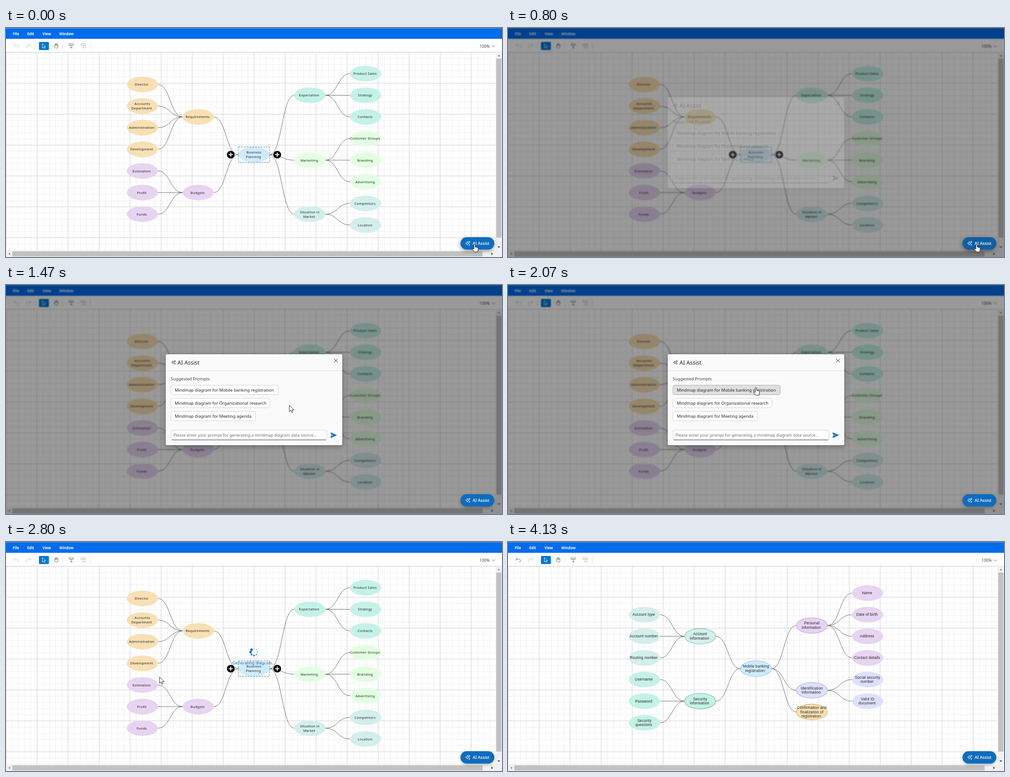
An HTML page that plays this animation: 1099x509 px, repeating every 6800 ms.

```html
<!DOCTYPE html>
<html lang="en">
<head>
<meta charset="utf-8">
<title>Mind map editor</title>
<style>
html, body { margin: 0; width: 100%; height: 100%; overflow: hidden; background: #fff; }
svg, #shade { position: absolute; left: 0; top: 0; width: 1099px; height: 509px; }
#shade { background: rgba(0,0,0,.4); backdrop-filter: blur(1px); }
text { font-family: "Noto Sans", "Open Sans", sans-serif; white-space: pre; }
.bold { font-weight: 600; fill: #fff; }
.label { font-size: 7.6px; letter-spacing: .25px; fill: #222; text-anchor: middle; }
.plain .label { font: 8.2px "Liberation Sans", Arial, sans-serif; letter-spacing: .22px; }
.line { fill: none; stroke: #444; stroke-width: .8; }
.icon { fill: none; stroke: #616161; stroke-width: .9; stroke-linecap: round; stroke-linejoin: round; }
.faint { stroke: #c4c4c4; }
#button rect { filter: drop-shadow(0 2px 3px rgba(0,0,0,.3)); }
#button.hover rect { filter: drop-shadow(0 3px 5px rgba(0,0,0,.4)); }
#panel { filter: drop-shadow(0 3px 6px rgba(0,0,0,.3)); }
</style>
</head>
<body>
<svg id="app" viewBox="0 0 1099 509"></svg>
<div id="shade"></div>
<svg id="top" viewBox="0 0 1099 509"></svg>
<script>
const TICK = 1000 / 15, LOOP = 6800;
const $ = id => document.getElementById(id);
const rect = (x, y, w, h, fill, more = '') =>
  `<rect x="${x}" y="${y}" width="${w}" height="${h}" fill="${fill}" ${more}/>`;
const path = (d, more = 'class="icon"') => `<path d="${d}" ${more}/>`;
const text = (x, y, size, str, more = 'fill="#242424"') =>
  `<text x="${x}" y="${y}" font-size="${size}" ${more}>${str}</text>`;

// ---- mind maps: [label, fill, children, stroke]
const ORANGE = '#f8e0b3', PURPLE = '#e7d4f1', MINT = '#c4f2e6',
  GREEN = '#e3ffe2', TEAL = '#d3efeb', LILAC = '#dee0ff', SKY = '#d0ebff';

const planning = {
  root: ['Business|Planning', SKY],
  left: { top: 125.5, groups: [
    ['Requirements', ORANGE, ['Director', 'Accounts|Department', 'Administration', 'Development']],
    ['Budgets', PURPLE, ['Estimation', 'Profit', 'Funds']]] },
  right: { top: 101.5, groups: [
    ['Expectation', MINT, ['Product Sales', 'Strategy', 'Contacts']],
    ['Marketing', GREEN, ['Customer Groups', 'Branding', 'Advertising']],
    ['Situation in|Market', TEAL, ['Competitors', 'Location']]] }
};
const banking = {
  root: ['Mobile banking|registration:', SKY, '#93c9ec'],
  left: { top: 161.5, groups: [
    ['Account|information', TEAL, ['Account type', 'Account number', 'Routing number'], '#8cc3ba'],
    ['Security|information', MINT, ['Username', 'Password', 'Security|questions'], '#83bdac']] },
  right: { top: 113.5, groups: [
    ['Personal|information', PURPLE, ['Name', 'Date of birth', 'Address', 'Contact details'], '#c9a9dc'],
    ['Identification|information', LILAC, ['Social security|number', 'Valid ID|document'], '#b0b4e0'],
    ['Confirmation and|finalization of|registration', ORANGE, [], '#e2b968']] }
};
const CX = 549.5, CY = 281.5, RX = 34.5, RY = 17.3, COL = 123.7, ROW = 48.05;

function node(x, y, label, fill, stroke = 'none') {
  const lines = label.split('|');
  const first = y + 2.8 - (lines.length - 1) * 4.9;
  return `<ellipse cx="${x}" cy="${y}" rx="${RX}" ry="${RY}" fill="${fill}" stroke="${stroke}" stroke-width="1.3"/>` +
    lines.map((s, i) => `<text class="label" x="${i == lines.length - 1 ? x - 1.3 : x}" y="${first + i * 9.8}">${s}</text>`).join('');
}
function link(x1, y1, x2, y2, dir) {
  const a = x1 + dir * RX, b = x2 - dir * RX, m = (a + b) / 2;
  return path(`M${a} ${y1}C${m} ${y1} ${m} ${y2} ${b} ${y2}`, 'class="line"');
}
function mindmap(map) {
  let links = '', nodes = node(CX, CY, ...map.root);
  for (const [side, dir] of [['left', -1], ['right', 1]]) {
    let y = map[side].top;
    const x1 = CX + dir * COL, x2 = x1 + dir * COL;
    for (const [label, fill, kids, stroke] of map[side].groups) {
      const mid = y + (kids.length - 1) * ROW / 2;
      links += link(CX, CY, x1, mid, dir);
      nodes += node(x1, mid, label, fill, stroke);
      for (const kid of kids) {
        links += link(x1, mid, x2, y, dir);
        nodes += node(x2, y, kid, fill);
        y += ROW;
      }
    }
  }
  return links + nodes;
}

// ---- editor window
function grid() {
  const step = 13.7375;
  let minor = '', major = '';
  for (let i = 0; i < 80; i++) {
    const d = `M${i * step + .3} 54V495` + (i < 33 ? `M0 ${54.1 + i * step}H1085` : '');
    if (i % 5) minor += d; else major += d;
  }
  return path(minor, 'stroke="#ebebeb" stroke-width=".8"') + path(major, 'stroke="#cfcfcf"');
}
const plus = x => `<circle cx="${x}" cy="${CY}" r="8.6"/>` +
  path(`M${x - 4.7} ${CY}h9.4M${x} ${CY - 4.7}v9.4`, 'stroke="#fff" stroke-width="1.9"');
const pointer = 'M0 0V14L3.3 11 5.5 16.2 7.9 15.2 5.7 10.3H10.4Z';
const sparkle = (x, y, s, color) => path(
  'M-1 -4Q-.6 0 3 0Q-.6 0-1 4Q-1.4 0-5 0Q-1.4 0-1-4ZM3.5-5Q3.7-3.2 5.5-3Q3.7-2.8 3.5-1Q3.3-2.8 1.5-3Q3.3-3.2 3.5-5ZM3.5 2Q3.7 3.3 5 3.5Q3.7 3.7 3.5 5Q3.3 3.7 2 3.5Q3.3 3.3 3.5 2Z',
  `transform="translate(${x} ${y}) scale(${s})" fill="none" stroke="${color}" stroke-width=".9"`);
const treeIcon = x => `M${x - 4.5} 35h9v3.5h-9zM${x} 38.5v5.5`;

const menu = [['File', 15], ['Edit', 47], ['View', 81], ['Window', 118]]
  .map(([s, x]) => text(x, 16, 7.9, s, 'class="bold"')).join('');

$('app').innerHTML =
  rect(0, 0, 1099, 509, '#fff') + grid() +
  rect(0, 0, 1099, 1, '#7f9fc8') + rect(0, 1, 1099, 23, '#036ceb') + menu +
  rect(0, 24, 1099, 30, '#fff') + rect(0, 53.3, 1099, .8, '#d4d4d4') +
  path('M65 33V47M125.5 33V47M186.5 33V47', 'stroke="#dcdcdc"') +
  path('M20.5 35L17.5 38.2 20.5 41.4M17.5 38.2H25Q28 38.5 28 41.5 28 44.2 25 44.5', 'id="undo" class="icon"') +
  path('M52.3 35L55.3 38.2 52.3 41.4M55.3 38.2H47.8Q44.8 38.5 44.8 41.5 44.8 44.2 47.8 44.5', 'class="icon faint"') +
  rect(73, 31, 22, 18, '#0078d4', 'rx="2"') +
  path('M80.5 34.5V44.5L83 42.2 85 45.5 86.3 44.6 84.6 41.5H88Z', 'fill="none" stroke="#fff" stroke-width=".8"') +
  path('M108.5 40V36Q109.3 35 110 36V35Q111 33.8 111.8 35V35.5Q112.8 34.5 113.6 36V37Q115 36 115.3 37.5V41Q115 45 111.5 45 109 45 106.8 40.5 107.2 39.3 108.5 40M110 36V39M111.8 35.5V39M113.6 37V39.5') +
  path(treeIcon(144.7) + 'M142 44h5.5') +
  path(treeIcon(171) + 'M168 44h3M174 42l3 3M177 42l-3 3M177 38v2', 'class="icon faint" style="stroke:#aaa"') +
  text(1049, 44, 9, '100%', 'fill="#444"') + path('M1076.5 39L1080 42.5 1083.5 39') +
  `<g id="before">${mindmap(planning)}${rect(515, 264.3, 69, 34.4, 'none', 'stroke="#11777d" stroke-width=".9" stroke-dasharray="4.1 2.06"')}${plus(498)}${plus(601)}</g>` +
  `<g id="after" class="plain">${mindmap(banking)}</g>` +
  rect(1085, 54, 14, 455, '#f1f1f1') + rect(0, 495, 1099, 14, '#f1f1f1') +
  rect(1086.3, 68, 11.4, 398, '#c1c1c1') + rect(14, 496.3, 1042, 11.4, '#c1c1c1') +
  path('M9 499v6l-3.5-3zM1089 63h6l-3-3.5z', 'fill="#8a8a8a"') +
  path('M1075.5 499v6l3.5-3zM1089 485.5h6l-3 3.5z', 'fill="#444"');

// ---- assistant dialog, spinner, button and pointer
const prompts = [['Mobile banking registration', 238], ['Organizational research', 219.5], ['Meeting agenda', 188]];
const chips = prompts.map(([s, w], i) => {
  const y = 222.8 + i * 29;
  return rect(365.5, y, w - .5, 21, '#fff', `rx="4" stroke="#d1d1d1" id="chip${i}"`) +
    text(374, y + 14.4, 9.3, 'Mindmap diagram for ' + s);
}).join('');

$('top').innerHTML =
  `<g id="dialog">` +
  rect(354, 154, 391, 202, '#fafafa', 'rx="3" id="panel"') +
  path('M354 190.3H745', 'stroke="#dedede"') +
  sparkle(371, 172, .9, '#333') + text(380, 177.3, 12.4, 'AI Assist') +
  path('M727 164l8 8M735 164l-8 8', 'stroke="#333"') +
  text(365, 212.3, 9.4, 'Suggested Prompts', 'fill="#424242"') + chips +
  rect(365.5, 322.8, 345.5, 21.5, '#fff', 'rx="3" stroke="#d1d1d1"') +
  path('M367 344.4H709.5', 'stroke="#616161" stroke-width="1.1"') +
  text(371, 337.4, 8.96, 'Please enter your prompt for generating a mindmap diagram data source...', 'fill="#6b6b6b"') +
  path('M719 327.5L733.5 333.8 719 340.2 720.3 334.8 727 333.8 720.3 332.8Z', 'fill="#0f6cbd"') +
  `</g><g id="busy" fill="#0f6cbd"><g id="dots">${'<circle/>'.repeat(8)}</g>` +
  text(549.3, 272, 9.3, 'Generating diagram...', 'text-anchor="middle"') + `</g>` +
  `<g id="button">${rect(1007, 465, 75, 27.6, 'inherit', 'rx="13.8"')}${sparkle(1023, 478.5, 1, '#fff')}` +
  text(1034, 482.3, 9.4, 'AI Assist', 'fill="#fff" stroke="#fff" stroke-width=".2"') + `</g>` +
  `<g id="cursor" fill="#fff" stroke="#111" stroke-linejoin="round">` +
  path(pointer, 'id="arrow" stroke-width=".9"') +
  path('M-1.5.7Q0-.9 1.5.7V6L6 7Q8.4 8 8 11L6.8 17H0L-5 11.2Q-5.3 8.8-3.4 9.4L-1.5 11Z', 'id="hand"') + `</g>`;

// ---- motion
const show = (id, on) => $(id).style.display = on ? '' : 'none';
const dots = [...$('dots').children];
dots.forEach((dot, i) => {
  dot.setAttribute('cx', 549.4 + 7.6 * Math.cos(i * Math.PI / 4));
  dot.setAttribute('cy', 244.7 + 7.6 * Math.sin(i * Math.PI / 4));
});
const radii = [2.9, 2.6, 2.1, 1.7, 1.4, 1.1, .9, .7];
const pauses = [35, 37, 39, 54, 60];
const fade = [0, .17, .52, .78, .93, 1];

// pointer route: tick, x, y
const route = [[0, 1038.3, 480.8], [14, 1038.3, 480.8], [19, 637, 272], [21, 637, 272], [26, 549.3, 228],
  [39, 549.3, 228], [42, 340, 300], [44, 163, 400], [47, 600, 480], [49, 1040, 484], [50, 1045, 515]];

function place(k) {
  const i = route.findIndex(p => p[0] > k);
  if (i < 0) return null;
  const [a, ax, ay] = route[i - 1], [b, bx, by] = route[i];
  const u = (k - a) / (b - a), e = u * u * (3 - 2 * u);
  return [ax + (bx - ax) * e, ay + (by - ay) * e];
}

function draw(k) {
  const open = k >= 11 && k < 34;
  show('shade', open);
  show('dialog', open);
  $('shade').style.opacity = k == 11 ? .6 : 1;
  $('dialog').style.opacity = fade[Math.max(0, Math.min(5, k - 11))];
  $('chip0').setAttribute('fill', k >= 31 ? '#e0e0e0' : '#fff');
  $('chip0').setAttribute('stroke', k >= 31 ? '#a8a8a8' : '#d1d1d1');

  show('before', k < 61);
  show('after', k >= 61);
  $('undo').classList.toggle('faint', k < 62);

  show('busy', k >= 34 && k < 61);
  const held = pauses.includes(k) ? k - 1 : k;
  const head = Math.max(0, Math.floor((held - 34) * TICK / 92));
  dots.forEach((dot, i) => dot.setAttribute('r', radii[(head - i + 800) % 8]));

  const dark = k >= 8 && k < 16 || k >= 49 && k < 52;
  $('button').setAttribute('fill', dark ? '#115ea3' : '#0f6cbd');
  $('button').classList.toggle('hover', dark || k < 8);

  const at = place(k);
  show('cursor', at);
  if (!at) return;
  const [x, y] = at;
  const hand = x > 1007 && y > 465 || open && x > 365 && x < 603 && y > 222 && y < 244;
  $('cursor').setAttribute('transform', `translate(${x} ${y})`);
  show('hand', hand);
  show('arrow', !hand);
}

const start = performance.now();
let last = -1;
function loop() {
  const t = (performance.now() - start) % LOOP;
  const k = Math.floor((t + 4) / TICK) % 102;
  if (k != last) draw(last = k);
  requestAnimationFrame(loop);
}
loop();
</script>
</body>
</html>
```
